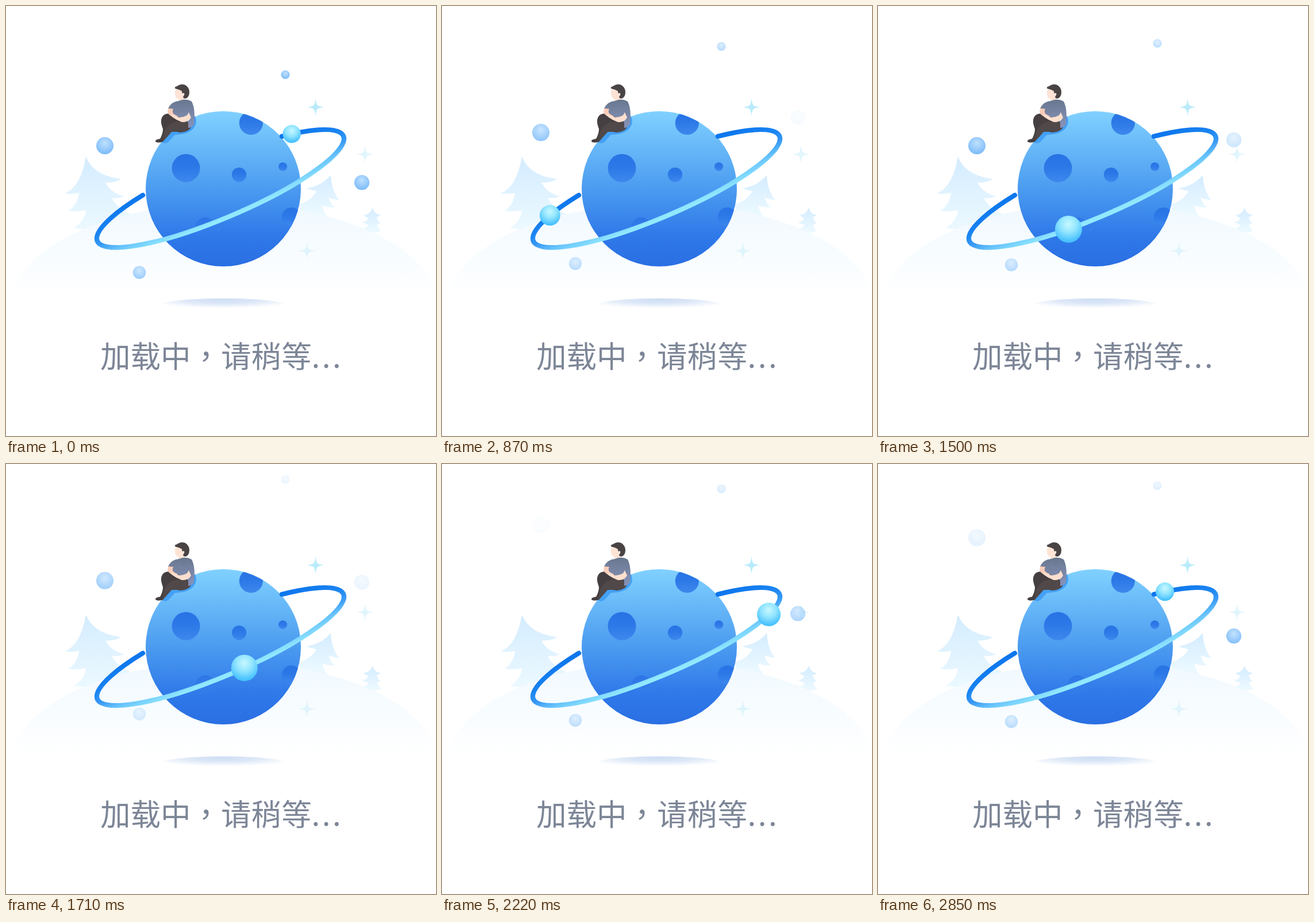
Write an HTML page that moves like this. It is 748x748 px and loops after 2880 ms.

```html
<!DOCTYPE html>
<html lang="zh-TW">
<head>
<meta charset="utf-8">
<style>
html, body { margin: 0; width: 100%; height: 100%; overflow: hidden; background: #fff }
svg { display: block; width: 100vw; height: 100vh }
text { font: 52.5px "Noto Sans CJK TC", "Noto Sans CJK SC", "Noto Sans CJK", sans-serif; fill: #7d8697 }
</style>
</head>
<body>
<svg viewBox="0 0 748 748">
  <defs>
    <linearGradient id="planetFill" x2="0" y2="1">
      <stop stop-color="#80d1ff"/><stop offset=".5" stop-color="#4b9bf0"/>
      <stop offset=".8" stop-color="#2f79e9"/><stop offset="1" stop-color="#2a6fe3"/>
    </linearGradient>
    <linearGradient id="crater" x2="0" y2="1">
      <stop stop-color="#2873e5"/><stop offset=".45" stop-color="#2c78e7"/><stop offset="1" stop-color="#3d88ed"/>
    </linearGradient>
    <linearGradient id="faintCrater" x2=".2" y2="1">
      <stop stop-color="#2a6fe3"/><stop offset=".8" stop-color="#3580eb" stop-opacity=".3"/>
      <stop offset="1" stop-color="#3580eb" stop-opacity="0"/>
    </linearGradient>
    <linearGradient id="hillFill" gradientUnits="userSpaceOnUse" x1="0" y1="345" x2="0" y2="505">
      <stop stop-color="#f1f9ff"/><stop offset=".5" stop-color="#f7fcff"/><stop offset="1" stop-color="#fff"/>
    </linearGradient>
    <linearGradient id="treeFill" x2="0" y2="1">
      <stop stop-color="#d4ecff"/><stop offset="1" stop-color="#eefaff"/>
    </linearGradient>
    <linearGradient id="ringFill" gradientUnits="userSpaceOnUse" x1="0" y1="-45" x2="0" y2="50">
      <stop stop-color="#0c75ec"/><stop offset=".35" stop-color="#1a84f1"/><stop offset=".55" stop-color="#3798f4"/>
      <stop offset=".75" stop-color="#69c5fb"/><stop offset="1" stop-color="#92e8ff"/>
    </linearGradient>
    <linearGradient id="shirt" x2="0" y2="1">
      <stop stop-color="#68778f"/><stop offset="1" stop-color="#8894bb"/>
    </linearGradient>
    <radialGradient id="moonFill" cx=".57" cy=".33" r=".62">
      <stop stop-color="#c8f8ff"/><stop offset=".5" stop-color="#92e5ff"/><stop offset="1" stop-color="#4ac2fe"/>
    </radialGradient>
    <radialGradient id="bubbleFill" cx=".5" cy=".35" r=".65">
      <stop stop-color="#bfe1fe"/><stop offset="1" stop-color="#7bbaf9"/>
    </radialGradient>
    <radialGradient id="shadowFill" cy=".1" r=".62">
      <stop stop-color="#cfdef4"/><stop offset=".45" stop-color="#dce7f7"/><stop offset="1" stop-color="#fff"/>
    </radialGradient>
    <clipPath id="disc"><circle cx="378" cy="318" r="135"/></clipPath>
    <path id="star" d="M0-15C2-2 2-2 15 0C2 2 2 2 0 15C-2 2-2 2-15 0C-2-2-2-2 0-15Z"/>
  </defs>

  <g fill="url(#treeFill)">
    <path d="M139 262Q152 295 200 301Q190 308 173 307Q182 325 205 331Q197 335 184 334Q194 353 217 362V400L118 386Q137 375 139 355Q125 359 109 356Q125 345 127 325Q115 328 102 326Q130 315 139 262Z"/>
    <path d="M565 294Q548 314 522 317Q531 321 540 322Q533 337 510 345L512 360L560 368Q552 358 550 347Q560 351 572 350Q564 344 561 333Q569 337 579 337Q566 320 565 294Z"/>
  </g>
  <ellipse cx="380" cy="522" rx="371" ry="178" fill="url(#hillFill)" clip-path="inset(0 0 178px 0)"/>
  <path fill="url(#treeFill)" d="M638 351Q641 362 652 364Q649 367 645 367Q647 375 652 378Q648 380 645 380Q648 388 653 391L640 395L621 387Q628 386 631 381Q625 379 619 376Q628 375 630 369Q626 367 622 364Q634 362 638 351Z"/>
  <use href="#star" x="538.5" y="176" fill="#b9ebfb"/>
  <use href="#star" x="624.5" y="258" fill="#e1f5fd"/>
  <use href="#star" x="523.5" y="426" fill="#dff5fb"/>
  <ellipse cx="378" cy="520.5" rx="108" ry="12" fill="url(#shadowFill)"/>
  <g id="bubbles" fill="url(#bubbleFill)"></g>

  <g id="back" transform="translate(373 317.5) rotate(-23.1)"></g>
  <circle cx="378" cy="318" r="135" fill="url(#planetFill)"/>
  <g clip-path="url(#disc)" fill="url(#crater)">
    <circle cx="313" cy="282" r="24.5"/>
    <circle cx="405.5" cy="293.5" r="12.6"/>
    <circle cx="481.5" cy="279.5" r="7.6"/>
    <circle cx="426.3" cy="203.5" r="20.6"/>
    <circle cx="496.5" cy="367" r="16.6"/>
    <circle cx="347" cy="386" r="18" fill="url(#faintCrater)"/>
  </g>

  <g id="person">
    <path fill="#43a0f5" d="M268 234Q277 243 284 235L294 224Q316 224 326 213Q334 203 329 192L300 190Z"/>
    <path fill="#453f41" d="M270 198Q272 187 284 187L300 190L323 206Q322 218 304 220Q294 218 288 219L273 236Q265 239 260 236Q259 232 268 231Q273 222 273 214Q269 203 270 198Z"/>
    <path fill="#574d4e" d="M273 232Q274 208 293 202L310 200L322 208Q318 219 304 220Q294 218 288 219L273 236Z" opacity=".65"/>
    <path fill="#fde3d5" d="M294 147Q300 143 308 147L311 164Q305 168 300 164L300 161Q293 161 294 147Z"/>
    <path fill="#4a4344" d="M294 141Q297 140 300 138Q305 135 311 137Q319 141 319 150Q319 158 313 161Q308 161 308 158Q312 153 309 151Q306 154 306 148Q301 145 295 144Q293 143 294 141Z"/>
    <path fill="url(#shirt)" d="M301 165Q313 160 323 166Q330 180 327 206Q322 212 317 212Q318 201 313 196L294 191L282 178Q288 166 301 165Z"/>
    <path fill="#f9cdb9" d="M282 178L291 179Q288 185 292 188L299 192L297 196Q283 191 281 185Z"/>
    <path fill="#fddfce" d="M287 188L299 193Q306 195 315 190L318 185L322 194Q317 203 306 202Q297 199 289 193Z"/>
  </g>

  <g transform="translate(373 317.5) rotate(-23.1)">
    <path d="M-128.7-42.3A232.7 50.8 0 1 0 133.9-41.5" fill="none" stroke="url(#ringFill)" stroke-width="8.2" stroke-linecap="round"/>
    <path id="orbit" d="M151.4-38.6A232.7 50.8 0 0 0-151.4 38.6A232.7 50.8 0 0 0 151.4-38.6" fill="none"/>
    <g id="front"><circle id="moon" fill="url(#moonFill)"/></g>
  </g>
  <text x="164" y="628.5">加载中，请稍等<tspan letter-spacing="3.7">...</tspan></text>
</svg>
<script>
const LOOP = 2880, STEP = 30, LENGTH = 985;
const $ = id => document.getElementById(id);
const set = (el, attrs) => { for (const k in attrs) el.setAttribute(k, attrs[k]); };

// x, start y, radius, period (ms), rise per period, start opacity
const bubbles = [
  [172, 243, 15, 750, 143.5, 1],
  [486, 119.5, 7.6, 600, 109, 1],
  [619, 307, 13.1, 930, 121, 1],
  [232, 463.5, 11.2, 660, 48.5, .75]
].map(([cx, y, r, period, rise, alpha]) => {
  const el = document.createElementNS("http://www.w3.org/2000/svg", "circle");
  set(el, { cx, r });
  $("bubbles").append(el);
  return { el, y, period, rise, alpha };
});

// time, distance along the orbit, moon radius
const keys = [
  [0, 0, 15.7], [510, 265, 15], [1095, 394, 19.8], [1230, 457, 21], [1500, 578.5, 23.5],
  [1950, 761, 22.5], [2490, 920, 18.5], [2850, 983, 16], [LOOP, LENGTH, 15.7]
];
const speed = i => (keys[i + 1][1] - keys[i][1]) / (keys[i + 1][0] - keys[i][0]);
const slope = i => {
  if (i === 0) return speed(0);
  if (i === keys.length - 1) return speed(i - 1);
  const a = speed(i - 1), b = speed(i);
  return 2 * a * b / (a + b);
};

function moonAt(t) {
  let i = 0;
  while (t >= keys[i + 1][0]) i++;
  const [t0, s0, r0] = keys[i], [t1, s1, r1] = keys[i + 1];
  const h = t1 - t0, p = (t - t0) / h, q = 1 - p;
  const s = q * q * (1 + 2 * p) * s0 + p * p * (1 + 2 * q) * s1
    + h * p * q * (q * slope(i) - p * slope(i + 1));
  return { s, r: r0 + (r1 - r0) * p };
}

function draw() {
  const t = Math.floor(performance.now() % LOOP / STEP) * STEP;
  for (const { el, y, period, rise, alpha } of bubbles) {
    const p = t % period / period;
    set(el, { cy: y - rise * p, opacity: alpha * (1 - p) });
  }
  const { s, r } = moonAt(t), orbit = $("orbit");
  const { x, y } = orbit.getPointAtLength(s / LENGTH * orbit.getTotalLength());
  const moon = $("moon"), layer = $(s > 20 && s < 305 ? "back" : "front");
  set(moon, { cx: x, cy: y, r });
  if (moon.parentNode !== layer) layer.append(moon);
  requestAnimationFrame(draw);
}
draw();
</script>
</body>
</html>
```
